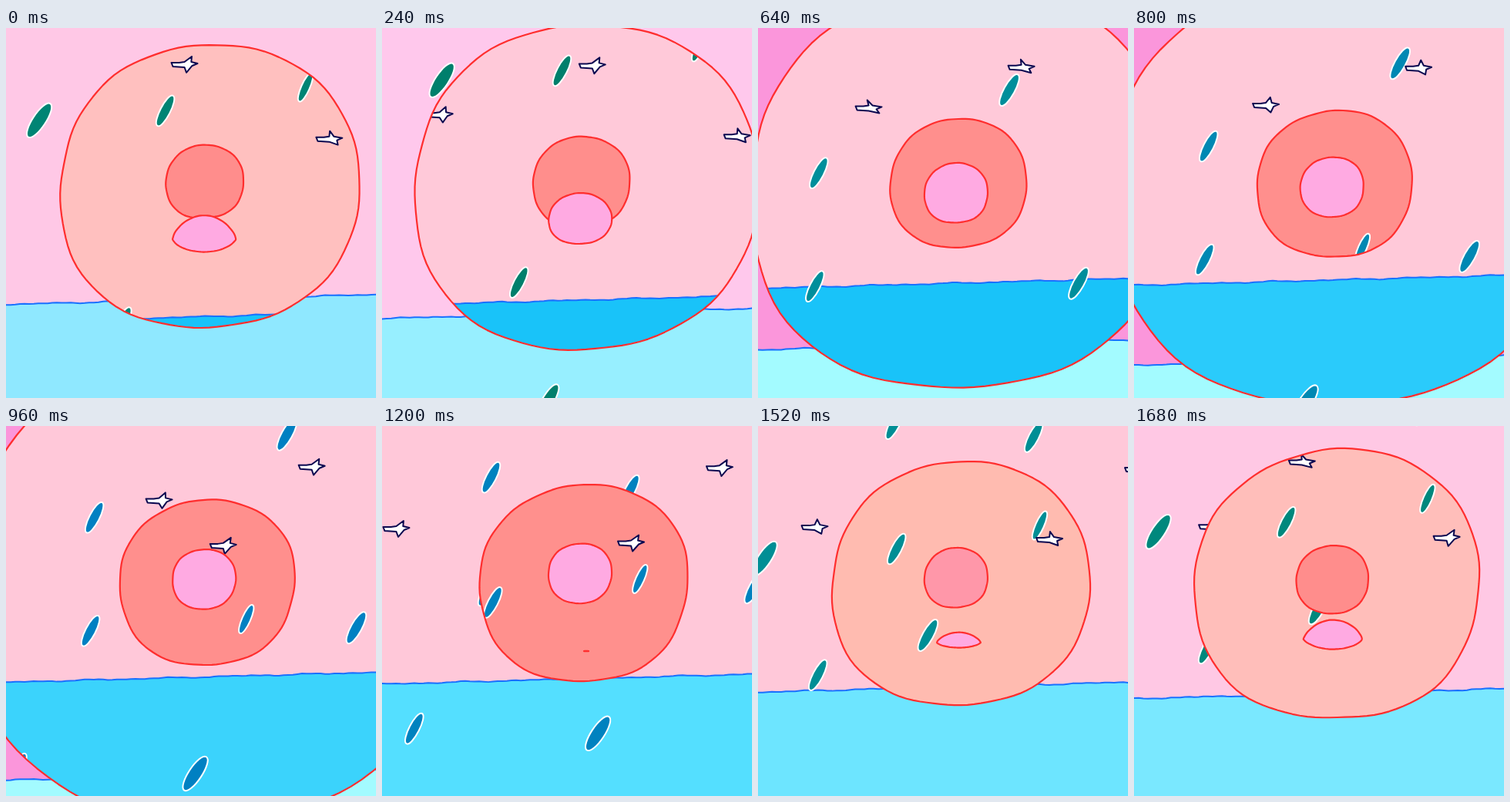
Recreate the animation shown at these times as an HTML page with a canvas. Size 480x480 px, loop 1760 ms.

```html
<!DOCTYPE html>
<html lang="en">
<head>
<meta charset="utf-8">
<title>Endless doughnut</title>
<style>
  html, body { margin: 0; height: 100%; overflow: hidden; }
  canvas { display: block; }
</style>
</head>
<body>
<canvas id="stage" width="480" height="480"></canvas>
<script>
const ctx = document.getElementById('stage').getContext('2d');
const LOOP = 1760, STEP = 80;

// Each ring lives for several loops: mouth, hole, doughnut, then the whole sky.
// All ages are in ms.
const BORN = 1200, GROW = 3300, SEA = 5200, FULL = 6480;

const height = [[1200, 292], [1760, 267], [2400, 214], [2900, 190], [3400, 199], [5600, 206]];
const skin = [
  [2960, 255, 170, 226], [3440, 255, 141, 140], [4720, 255, 144, 141], [5040, 255, 187, 176],
  [5280, 255, 192, 191], [5520, 255, 201, 217], [6800, 255, 200, 217], [6960, 255, 200, 228],
  [7280, 255, 200, 236], [7680, 251, 150, 219]
];
const water = [
  [5920, 25, 195, 249], [6480, 84, 223, 255], [6960, 122, 232, 255],
  [7040, 143, 232, 255], [7680, 163, 251, 255]
];
const sprinkles = [ // birth age, x, y, width
  [4160, 281, 320, 12], [4480, 117, 281, 14], [4720, 182, 341, 15], [4880, 106, 469, 14],
  [5520, 34, 275, 14], [5520, 29, 422, 14], [5520, 368, 418, 15], [6160, 286, 153, 14],
  [6000, 211, 503, 18], [6160, 6, 462, 14], [6560, -26, 224, 18], [7120, 195, 518, 16]
];
const birds = [ // birth age, x, y, climb per ms
  [4400, 268, 156, -0.014], [6320, -9, 134, -0.006], [5440, 61, 114, -0.022], [5120, 204, 46, 0.006]
];

const clamp = v => Math.min(1, Math.max(0, v));

function track(rows, t) {
  const next = rows.findIndex(row => row[0] > t);
  if (next < 1) return rows.at(next).slice(1);
  const a = rows[next - 1], b = rows[next], p = (t - a[0]) / (b[0] - a[0]);
  return a.slice(1).map((v, i) => v + (b[i + 1] - v) * p);
}
const tint = (rows, t) => `rgb(${track(rows, t).map(Math.round)})`;

// Hand-drawn unevenness, new for each step
const wobble = (a, seed) =>
  0.45 * Math.sin(3 * a + seed * 2.3) + 0.3 * Math.sin(5 * a + seed * 4.1) +
  0.25 * Math.sin(13 * a + seed * 1.7);

function ringPath(age, seed) {
  const grown = Math.max(0, age - GROW);
  const smile = clamp((2040 - age) / 320);
  const opened = clamp((age - BORN) / 1000 + 0.05);
  const rx = 3 + 38 * (1 - clamp((LOOP - age) / 560) ** 1.3) + 0.038 * grown + 1.98e-5 * grown ** 2;
  const ry = 0.945 * rx * opened;
  const cx = 257 + 0.0035 * grown + 8 * clamp((LOOP - age) / 560);
  const cy = track(height, age)[0] + 0.32 * smile * ry;
  const path = new Path2D();
  for (let i = 0; i < 120; i++) {
    const a = i * Math.PI / 60, s = Math.sin(a), q = Math.sin(2 * a);
    const bulge = (q * q * (0.031 + 0.014 * s) - 0.017 * q) * (1 - smile);
    const k = 1 + bulge + 0.012 * wobble(a, seed);
    const y = Math.sign(s) * Math.abs(s) ** (1 + 0.4 * smile);
    const side = 1 - Math.sign(s) * 0.32 * smile;
    path.lineTo(cx + Math.cos(a) * rx * k, cy + y * ry * side * k);
  }
  path.closePath();
  return path;
}

function drawSea(age, seed) {
  const d = age - 6240;
  const level = 326 + (d < 0 ? 5.3e-5 : 4.1e-5) * d * d;
  const line = new Path2D();
  for (let x = -6; x <= 486; x += 6)
    line.lineTo(x, level + 6.5 - 13 * x / 480 + 1.2 * wobble(x / 45, seed));
  const body = new Path2D(line);
  body.lineTo(486, 490);
  body.lineTo(-6, 490);
  ctx.fillStyle = tint(water, age);
  ctx.fill(body);
  ctx.strokeStyle = '#1a70ff';
  ctx.lineWidth = 2;
  ctx.stroke(line);
}

// Bigger sprinkles drift further sideways and lean with their path.
function drawSprinkle([birth, x, y, width], age) {
  const t = age - birth, vx = 0.008 * width, vy = -0.217;
  if (t < 0 || t > LOOP) return;
  const blue = (1 + Math.cos((age - 1060) / LOOP * 2 * Math.PI)) / 2;
  ctx.beginPath();
  ctx.ellipse(x + vx * t, y + vy * t, 7 + width, width / 2 - 1.5, Math.atan2(vy, vx), 0, 7);
  ctx.strokeStyle = '#fff';
  ctx.lineWidth = 4;
  ctx.stroke();
  ctx.fillStyle = `rgb(0, ${126 + 64 * blue * (1 - blue)}, ${107 + 90 * blue})`;
  ctx.fill();
}

function drawBird([birth, x, y, climb], age) {
  const t = age - birth;
  if (t < 0 || t > LOOP) return;
  const f = Math.cos(age / STEP * 2.1 + birth);
  const outline = [[-17, -2], [-7, -2], [0, -3], [4 + 6 * f, -10], [7 + 2 * f, -3], [17, -1],
    [10, 2], [8 - 6 * f, 9 + 2 * f], [0, 4], [-15, 3]];
  ctx.beginPath();
  for (const [dx, dy] of outline) ctx.lineTo(x + 0.172 * t + dx, y + climb * t + dy);
  ctx.closePath();
  ctx.fillStyle = '#fff';
  ctx.fill();
  ctx.strokeStyle = '#0b0850';
  ctx.lineWidth = 2;
  ctx.stroke();
}

function drawRing(age) {
  const seed = age / STEP;
  const edge = age < FULL ? ringPath(age, seed) : null;
  ctx.save();
  if (edge) ctx.clip(edge);
  ctx.fillStyle = tint(skin, age);
  ctx.fillRect(0, 0, 480, 480);
  if (age >= SEA) drawSea(age, seed);
  sprinkles.forEach(row => drawSprinkle(row, age));
  birds.forEach(row => drawBird(row, age));
  ctx.restore();
  if (!edge) return;
  ctx.strokeStyle = '#ff2e2e';
  ctx.lineWidth = 2.2;
  ctx.stroke(edge);
}

function frame() {
  const time = Math.floor(performance.now() % LOOP / STEP) * STEP;
  ctx.lineJoin = 'round';
  for (let loop = 4; loop >= 0; loop--) {
    const age = loop * LOOP + time;
    if (age >= BORN) drawRing(age);
  }
  requestAnimationFrame(frame);
}
frame();
</script>
</body>
</html>
```
